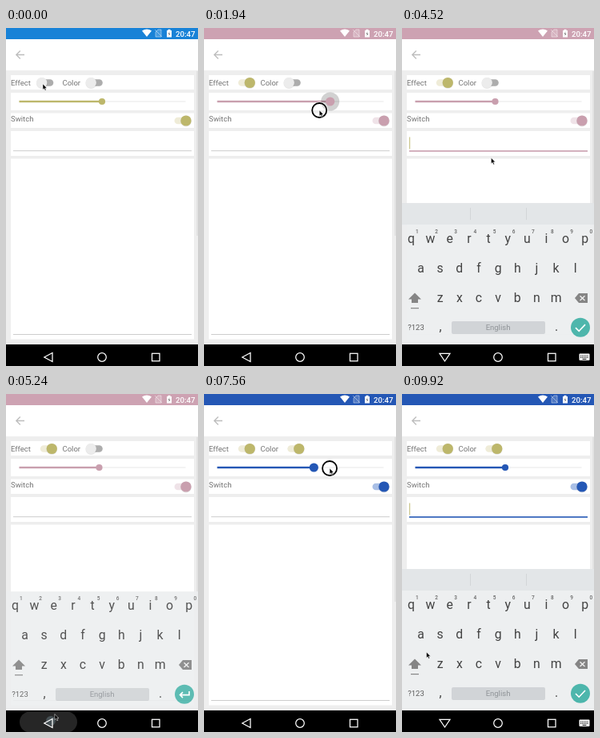
These frames come from a looping animation (240x423 px, 9940 ms). An HTML page:

```html
<!DOCTYPE html>
<html lang="en">
<head>
<meta charset="utf-8">
<title>Theme demo</title>
<style>
  html, body { margin: 0; overflow: hidden; background: #eee; }
  svg { display: block; width: 100vw; height: 100vh; font-family: Roboto, sans-serif; }
  .label { font-size: 9.5px; fill: #737373; }
  .nav { fill: none; stroke: #fff; stroke-width: 1.25; }
  .key { font-size: 15.8px; fill: #424242; text-anchor: middle; }
  .small { font-size: 9.5px; fill: #5c5c5c; text-anchor: middle; }
  .digit { font-size: 6.5px; font-weight: 500; fill: #666; text-anchor: middle; }
</style>
</head>
<body>
<svg viewBox="0 0 240 423">
  <rect width="240" height="423" fill="#eee"/>
  <rect y="14" width="240" height="39" fill="#fff"/>
  <rect id="status" width="240" height="14"/>
  <path d="M170 3.6Q176 -.4 182 3.6L176 11Z" fill="#fff"/>
  <path d="M187 11V5L190 2H194V11ZM186 2L195 11" fill="#fff3" stroke="#fff8" stroke-width=".8"/>
  <path d="M201 3H202.5V1.8H205.5V3H207V11.5H201Z" fill="#fff"/>
  <path d="M204.6 4.5L202.6 7.6H204L203.5 10L205.4 6.9H204Z" fill="#666"/>
  <text x="212" y="10.6" font-size="9.7" font-weight="500" fill="#fff">20:47</text>
  <path d="M23 33.5H13M17.8 28.5L12.8 33.5L17.8 38.5" fill="none" stroke="#bdbdbd" stroke-width="1.3"/>

  <g fill="#fff">
    <rect x="6" y="59" width="229" height="18"/>
    <rect x="6" y="81" width="229" height="22"/>
    <rect x="6" y="106.5" width="229" height="18.5"/>
    <rect x="6" y="129" width="229" height="31"/>
    <rect x="6" y="163.5" width="229" height="226"/>
  </g>
  <rect x="238" y="54" width="2" height="206" fill="#ddd" opacity=".7"/>
  <g class="label">
    <text x="6" y="72">Effect</text>
    <text x="70.5" y="72">Color</text>
    <text x="6" y="116.7">Switch</text>
  </g>
  <rect x="16.5" y="91" width="208" height="2" fill="#f3f3f3"/>
  <rect id="bar" x="16.5" y="90.8" height="2.4"/>
  <circle id="halo" cy="92" r="11.5" opacity=".18"/>
  <circle id="thumb" cy="92"/>
  <g id="switches"></g>
  <rect id="line" x="9" y="153.2" width="223"/>
  <rect x="9" y="383" width="223" height="1" fill="#ccc"/>
  <rect id="caret" x="9" width="1.2" height="15" fill="#cbc68c"/>

  <g id="keyboard">
    <rect y="246" width="240" height="151" fill="#edeff0"/>
    <g id="strip">
      <rect y="219" width="240" height="27" fill="#e3e6e8"/>
      <path d="M85.5 225V240M155.5 225V240" stroke="#d2d5d8"/>
    </g>
    <g id="keys"></g>
    <path d="M16 331.5L24 339.5H20V344H12V339.5H8Z" fill="#858585"/>
    <rect x="11" y="350" width="10" height="1.2" fill="#858585"/>
    <path d="M216 338L221 332H232V344H221Z" fill="#858585"/>
    <path d="M222.5 335.2L228.5 341M228.5 335.2L222.5 341" stroke="#eee" stroke-width="1.4"/>
    <rect x="62" y="367" width="117" height="16" rx="2" fill="#d1d4d7"/>
    <text class="small" x="120" y="378.3" style="fill:#8f9397">English</text>
    <text class="small" x="17.5" y="378.3">?123</text>
    <text class="key" x="48" y="379">,</text>
    <text class="key" x="193" y="379">.</text>
    <circle cx="223" cy="374.7" r="12" fill="#4db6ac"/>
    <path id="action" fill="none" stroke="#fff" stroke-width="1.6"/>
  </g>

  <rect y="396" width="240" height="27"/>
  <g id="ripple">
    <rect x="17" y="397.5" width="72" height="26" rx="13" fill="#262626"/>
    <circle cx="56" cy="409" r="6" fill="#78909c" opacity=".4"/>
  </g>
  <path id="back" class="nav"/>
  <circle class="nav" cx="120" cy="412" r="5.3"/>
  <rect class="nav" x="182.5" y="407.3" width="9.5" height="9.5"/>
  <g id="ime">
    <rect x="221.5" y="407.5" width="13" height="8.5" rx="1" fill="#fff"/>
    <path d="M223 410H233M223 412.2H233" stroke="#000" stroke-width="1.2" stroke-dasharray="1.2 .9"/>
    <path d="M225.5 414.4H230.5" stroke="#000"/>
  </g>
  <g id="pointer">
    <g id="ring" fill="none">
      <circle r="9" stroke="#fff" stroke-width="3.4" opacity=".8"/>
      <circle r="9" stroke="#000" stroke-width="1.8"/>
    </g>
    <path d="M0 0V7.2L1.7 5.7L2.9 8.3L4.1 7.8L3 5.2H5.2Z" stroke="#fff" stroke-width=".5"/>
  </g>
</svg>
<script>
const LOOP = 9940, LAG = 70, OLIVE = '#bdb76b', PALE_OLIVE = '#efecd8';
const THEMES = [
  ['#1882d7', OLIVE, PALE_OLIVE],
  ['#cda2b2', '#c99fae', '#efe3e8'],
  ['#2457b5', '#2457b5', '#a9bfe6']
];
const $ = id => document.getElementById(id);
const set = (id, attrs) => { for (const k in attrs) $(id).setAttribute(k, attrs[k]); };
const show = (id, on) => set(id, { visibility: on ? 'visible' : 'hidden' });
const clamp = (v, lo, hi) => Math.min(hi, Math.max(lo, v));
const ease = (t, from, to) => {
  const u = clamp((t - from) / (to - from), 0, 1);
  return u * u * (3 - 2 * u);
};

const places = {
  effect: [46, 70], color: [110, 70], toggle: [219, 117], input: [115, 146],
  area: [121, 188], back: [57, 414], idle: [30.5, 323],
  grip: [118, 93], left: [34, 98], right: [166, 103], middle: [116.5, 103],
  far: [200, 93], end: [129, 95]
};
// The pointer's day: place, arrival, departure; controls are tapped just before departure
const steps = [
  ['effect', 0, 450], ['grip', 1160, 1200], ['left', 1470, 1470], ['right', 1780, 1780],
  ['middle', 2130, 2320], ['toggle', 2800, 2980], ['toggle', 2980, 3760],
  ['input', 4310, 4430], ['back', 5030, 5215], ['area', 5390, 5740], ['back', 6130, 6270],
  ['color', 6760, 6910], ['grip', 7240, 7360], ['far', 7775, 7775], ['end', 8000, 8080],
  ['toggle', 8360, 8560], ['toggle', 8560, 9060], ['input', 9440, 9520], ['idle', 9920, LOOP]
];
const tapped = (...names) => steps.filter(s => names.includes(s[0]))
  .map(([name, , leave]) => ({ name, at: leave - 40 }));
const near = (t, taps, before, after) => taps.some(p => t >= p.at - before && t < p.at + after);

const starts = steps.filter(s => s[0] === 'grip'), stops = steps.filter(s => /middle|end/.test(s[0]));
const drags = starts.map((s, i) => [s[1], stops[i][2]]);
const controls = tapped('effect', 'color', 'toggle', 'input', 'area', 'back');
const typing = tapped('input', 'area', 'back');

function pointer(t) {
  const i = steps.findIndex(s => t < s[2]), [name, arrive] = steps[i];
  const [fromName, , leave] = steps[Math.max(0, i - 1)];
  const a = places[fromName], b = places[name], u = i ? ease(t, leave, arrive) : 1;
  return a.map((v, k) => v + (b[k] - v) * u);
}

function sliderX(t) {
  const drag = drags.findLast(d => t - LAG >= d[0]);
  return drag ? pointer(clamp(t - LAG, drag[0], drag[1]))[0] : 120;
}

// Each tap swings the value between 0 and 1
const flip = (t, taps, value, delay = 10) => taps.reduce((v, { at }, i) =>
  v + ((i + value) % 2 ? -1 : 1) * ease(t, at + delay, at + delay + 85), value);

function toggle(x, y, on, color, pale, touched) {
  const cx = x + 12.5 * on, lit = on > .5;
  return `<rect x="${x - 2}" y="${y - 4.3}" width="16.5" height="8.6" rx="4.3" fill="${lit ? pale : '#adadad'}"/>
    ${touched ? `<circle cx="${cx}" cy="${y}" r="13.5" opacity=".06"/>` : ''}
    <circle cx="${cx}" cy="${y + .5}" r="6.9" opacity=".1"/>
    <circle cx="${cx}" cy="${y}" r="6.6" fill="${lit ? color : '#ececec'}"/>`;
}

function buildKeys() {
  const rows = ['qwertyuiop', 'asdfghjkl', 'zxcvbnm'];
  $('keys').innerHTML = rows.map((letters, r) => [...letters].map((c, i) => {
    const x = 11.4 + 12.1 * r * (r + 1) / 2 - 12.1 * (r > 1) * 0 + 24.15 * i;
    const digit = r ? '' : `<text class="digit" x="${x + 7.5}" y="256.5">${(i + 1) % 10}</text>`;
    return `<text class="key" x="${r < 2 ? x : x}" y="${269 + 37 * r}">${c}</text>${digit}`;
  }).join('')).join('');
}

function draw(t) {
  const changes = tapped('effect', 'color').filter(p => p.at <= t).length;
  const [status, accent, pale] = THEMES[changes];
  set('status', { fill: status });

  const x = sliderX(t), drag = drags.find(d => t >= d[0] && t < d[1]);
  set('bar', { width: x - 16.5, fill: accent });
  set('thumb', { cx: x, r: drag ? 5.6 : 4.1, fill: accent });
  set('halo', { cx: x });
  show('halo', drag && t - drag[0] > 330);

  const main = tapped('toggle');
  $('switches').innerHTML =
    toggle(44.8, 68.5, flip(t, tapped('effect'), 0), OLIVE, PALE_OLIVE) +
    toggle(106.3, 68.5, flip(t, tapped('color'), 0), OLIVE, PALE_OLIVE) +
    toggle(212.5, 116, flip(t, main, 1), accent, pale, near(t, main, 60, 110));

  const last = typing.findLast(p => t >= p.at + 10);
  const focus = last && last.name !== 'back' ? last.name : '';
  const input = focus === 'input';
  set('line', { height: input ? 1.6 : 1, fill: input ? accent : '#ccc' });
  set('caret', { y: input ? 136.5 : 170 });
  show('caret', focus && (t - last.at) % 900 < 450);

  const open = flip(t, typing, 0, 50);
  set('keyboard', { transform: `translate(0 ${(1 - open) * 12})`, opacity: open });
  show('strip', focus);
  set('action', { d: input ? 'M217 375L221.2 379.2L229 371' : 'M229 371V375.5H217.5M221 372L217.5 375.5L221 379' });
  set('back', { d: focus ? 'M47 407.3H60L53.5 417Z' : 'M47.8 412L58 406.5V417.5Z' });
  show('ime', focus);
  show('ripple', near(t, tapped('back'), -15, 120));

  const [px, py] = pointer(t);
  set('pointer', { transform: `translate(${px} ${py})` });
  show('ring', drag || near(t, controls, 70, 10));
}

function tick() {
  draw(performance.now() % LOOP);
  requestAnimationFrame(tick);
}
buildKeys();
tick();
</script>
</body>
</html>
```
